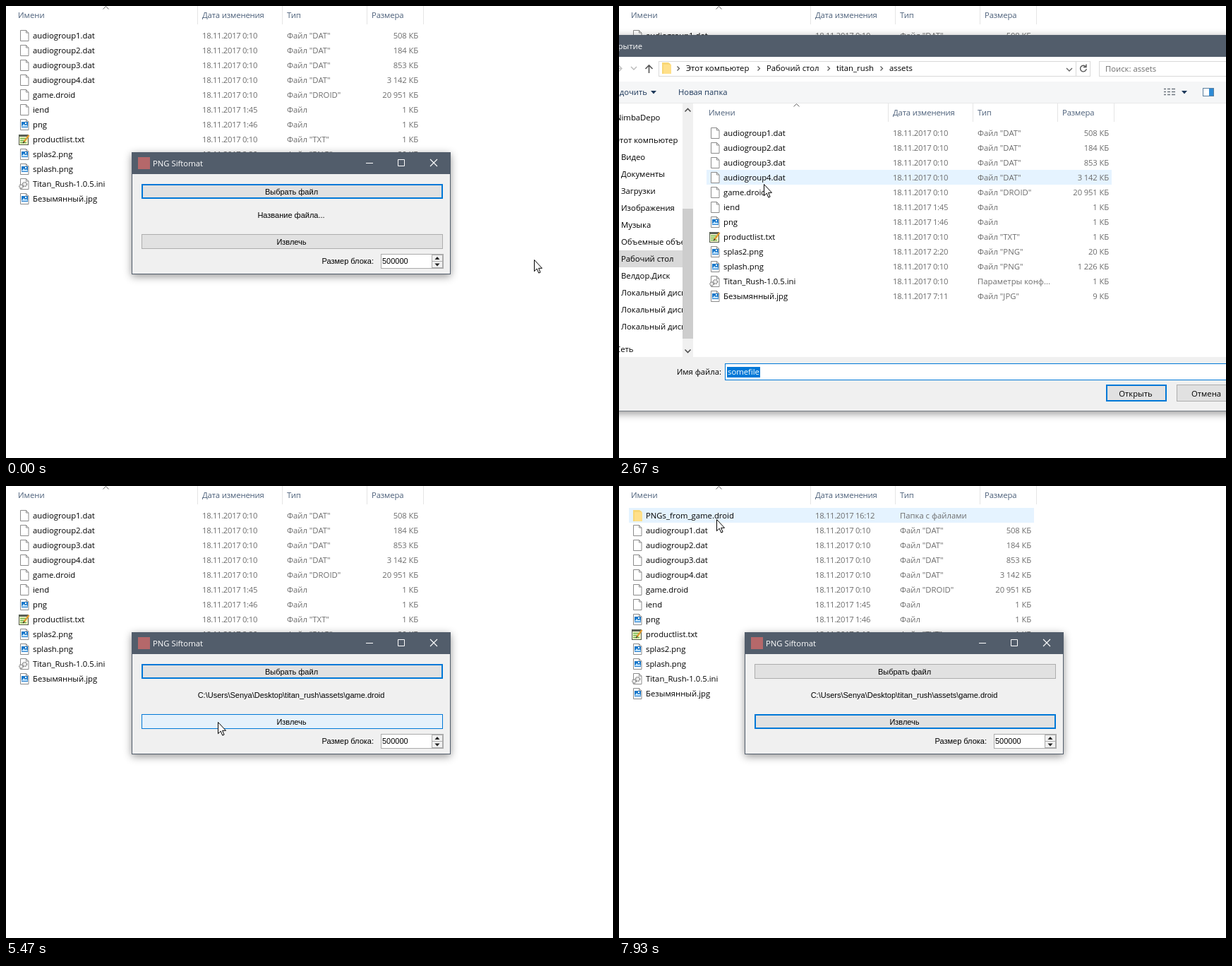
An HTML page that plays this animation: 860 by 640 pixels, repeating every 8000 ms.

```html
<!DOCTYPE html>
<html lang="ru">
<head>
<meta charset="utf-8">
<title>Извлечение PNG</title>
<style>
html, body { margin: 0; width: 100%; height: 100%; overflow: hidden; background: #fff; }
svg { display: block; width: 100%; height: 100%; }
text { font: 11.3px "Open Sans", "Noto Sans", sans-serif; white-space: pre; }
.a { font: 11px "Liberation Sans", Arial, sans-serif; }
.n { letter-spacing: -.33px; }
.h { letter-spacing: -.15px; }
.m { text-anchor: middle; }
.e { text-anchor: end; }
</style>
</head>
<body>
<svg id="stage" viewBox="0 0 860 640"></svg>
<script>
const LOOP = 8000, STEP = 200 / 3;
const BLUE = '#0078d7', BAR = '#525d6b', GREY = '#6d6d6d', HEAD = '#4c607a';
const FILE_PATH = String.raw`C:\Users\Senya\Desktop\titan_rush\assets\game.droid`;

const FILES = [
  ['audiogroup1.dat', '0:10', 'Файл "DAT"', '508 КБ'],
  ['audiogroup2.dat', '0:10', 'Файл "DAT"', '184 КБ'],
  ['audiogroup3.dat', '0:10', 'Файл "DAT"', '853 КБ'],
  ['audiogroup4.dat', '0:10', 'Файл "DAT"', '3 142 КБ'],
  ['game.droid', '0:10', 'Файл "DROID"', '20 951 КБ'],
  ['iend', '1:45', 'Файл', '1 КБ'],
  ['png', '1:46', 'Файл', '1 КБ'],
  ['productlist.txt', '0:10', 'Файл "TXT"', '1 КБ'],
  ['splas2.png', '2:20', 'Файл "PNG"', '20 КБ'],
  ['splash.png', '0:10', 'Файл "PNG"', '1 226 КБ'],
  ['Titan_Rush-1.0.5.ini', '0:10', 'Параметры конф...', '1 КБ'],
  ['Безымянный.jpg', '7:11', 'Файл "JPG"', '9 КБ']
];
const FOLDER = ['PNGs_from_game.droid', '16:12', 'Папка с файлами', ''];

const PLACES = [
  ['Видео', '#666'], ['Документы', '#a8adb2'], ['Загрузки', '#2a86d1'], ['Изображения', '#999'],
  ['Музыка', '#1e8fe0'], ['Объемные объекты', '#3aa5d8'], ['Рабочий стол', '#1f8fd6'],
  ['Велдор.Диск', '#3f9bd8'], ['Локальный диск', '#888'], ['Локальный диск', '#888'], ['Локальный диск', '#888']
];

// Pointer stops: time, x, y, eased
const TRACK = [
  [0, 748, 359], [867, 456, 265, 1], [1000, 434, 262], [2067, 434, 262],
  [2400, 300, 226], [2666, 205.5, 251.5], [2867, 195, 262], [3000, 190, 262], [3533, 168, 263],
  [4667, 168, 263], [4867, 200, 266], [5267, 300, 333], [5400, 300, 333], [5466, 300, 334],
  [6467, 300, 334], [6733, 372, 355, 1], [6867, 384, 357], [7400, 384, 358], [7930, 138, 47, 1]
];

const clamp = v => Math.max(0, Math.min(1, v));
const ramp = (t, a, b) => clamp((t - a) / (b - a));
const within = (t, a, b) => t >= a && t < b;

function pointer(t) {
  const i = TRACK.findIndex(p => p[0] > t);
  if (i < 0) return TRACK[TRACK.length - 1].slice(1, 3);
  const [t0, x0, y0] = TRACK[i - 1], [t1, x1, y1, eased] = TRACK[i];
  let u = ramp(t, t0, t1);
  if (eased) u = u * u * (3 - 2 * u);
  return [x0 + (x1 - x0) * u, y0 + (y1 - y0) * u];
}

const rect = (x, y, w, h, fill, more = '') =>
  `<rect x="${x}" y="${y}" width="${w}" height="${h}" fill="${fill}" ${more}/>`;
const frame = (x, y, w, h, fill, stroke) =>
  rect(x + .5, y + .5, w - 1, h - 1, fill, `stroke="${stroke}"`);
const line = (d, stroke, width = 1) =>
  `<path d="${d}" fill="none" stroke="${stroke}" stroke-width="${width}"/>`;
const shape = (d, fill) => `<path d="${d}" fill="${fill}"/>`;
const text = (x, y, s, fill = '#000', cls = '') =>
  `<text x="${x}" y="${y + 4}" fill="${fill}" class="${cls}">${s}</text>`;
const group = (content, attrs) => `<g ${attrs}>${content}</g>`;
const shadow = (dy, blur, a) => `style="filter:drop-shadow(0 ${dy}px ${blur}px rgba(0,0,0,${a}))"`;
const chevron = (x, y, c) => line(`M${x - 4} ${y - 2}l4 4 4-4`, c, 1.4);
const cross = (x, y, c) => line(`M${x - 5} ${y - 5}l10 10m0-10l-10 10`, c, 1.1);

function button(x, y, w, h, label, { focus = 0, hot = 0, down = 0, cls = 'm a' }) {
  const edge = down ? '#005499' : focus || hot ? BLUE : '#adadad';
  let s = rect(x, y, w, h, down ? '#cce4f7' : '#e1e1e1');
  if (!down) {
    s += rect(x, y, w, h, '#e5f1fb', `opacity="${hot}"`);
    if (focus) s += group(frame(x + 1, y + 1, w - 2, h - 2, 'none', BLUE), `opacity="${1 - hot}"`);
  }
  return s + frame(x, y, w, h, 'none', edge) + text(x + w / 2 - 1, y + h / 2 + .5, label, '#000', cls);
}

const folderIcon = (x, y) =>
  shape(`M${x} ${y - 8}h9l3 2v14h-12z`, '#f8d775') + rect(x + 2, y - 5, 11, 13, '#ffe08a');

function fileIcon(name, y) {
  const page = `<path d="M20.5 ${y - 7.5}h8l3.5 3.5v11.5h-11.5z" fill="#fff" stroke="#8b8b8b"/>` +
    line(`M28.5 ${y - 7.5}v3.5h3.5`, '#8b8b8b');
  const ext = name.split('.').pop();
  if (name === FOLDER[0]) return folderIcon(20, y);
  if (ext === 'txt') return frame(18, y - 7, 14, 15, '#f4f3c8', '#4f5a4a') +
    rect(19, y - 7, 12, 3, '#5c6157') + line(`M20 ${y - 1.5}h8m-8 3h7m-7 3h9`, '#69b54a', 1.4) +
    line(`M25 ${y + 4}l7.5-10`, '#e39a2d', 2.4) + line(`M24 ${y + 5}l2-2`, '#333', 1.5);
  if (ext === 'png' || ext === 'jpg') return page + rect(22, y - 4, 9, 8, '#1977c9') +
    shape(`M22 ${y + 3}l3-4 2 2 2-1 2 3z`, '#bfe3ff') + rect(27, y - 3, 2, 2, '#fff');
  if (ext === 'ini') return page +
    `<g fill="#eee" stroke="#8a8a8a" stroke-width="1.6" stroke-dasharray="1.6 .8">
      <circle cx="26.5" cy="${y + .5}" r="3"/><circle cx="21.5" cy="${y + 3.5}" r="2.6"/></g>`;
  return page;
}

function fileList(rows, hover, selected = -1) {
  let s = text(17, 13, 'Имени', HEAD) + text(278, 13, 'Дата изменения', HEAD, 'h') +
    text(398, 13, 'Тип', HEAD) + text(518, 13, 'Размера', HEAD, 'h') +
    line('M137.5 4.5l4-4 4 4', '#666') + line('M271.5 0v26m120-26v26m120-26v26m80-26v26', '#e5e5e5');
  rows.forEach(([name, time, type, size], i) => {
    const y = 42 + 21 * i;
    if (i === selected) s += frame(14, y - 11, 574, 21, '#cce8ff', '#99d1ff');
    else if (i === hover) s += rect(14, y - 11, 574, 21, '#e5f3ff');
    s += fileIcon(name, y) + text(38, y, name) + text(278, y, '18.11.2017 ' + time, GREY, 'n') +
      text(398, y, type, GREY) + text(584, y, size, GREY, 'e h');
  });
  return s;
}

function rowAt(x, y, dx, dy) {
  return x >= 14 + dx && x < 588 + dx ? Math.floor((y - 31 - dy) / 21) : -1;
}

function appWindow(t, x, y) {
  const active = t < 1330 || within(t, 4260, 6000) || t >= 7060;
  const over = top => +(active && x >= 192 && x < 619 && y >= top && y < top + 21);
  const ink = active ? '#fff' : '#999';
  const extracting = t >= 5720;
  return rect(178, 207, 452, 173, '#f0f0f0', active ? shadow(3, 6, .42) : shadow(2, 4, .28)) +
    rect(178, 207, 452, 31, active ? BAR : '#fff') +
    frame(178, 207, 452, 173, 'none', active ? BAR : '#a5a5a5') +
    rect(187, 214, 17, 17, active ? '#b5686a' : '#9c5a58') +
    text(208, 223, 'PNG Siftomat', ink) +
    line('M510 222.5h10M555.5 217.5h9v9h-9z', ink) + cross(606, 222, ink) +
    button(192, 252, 427, 21, 'Выбрать файл',
      { focus: !extracting, hot: over(252), down: within(t, 1190, 1730) }) +
    text(404, 296, t < 4260 ? 'Название файла...' : FILE_PATH, '#000', 'm a') +
    button(192, 323, 427, 21, 'Извлечь',
      { focus: extracting, hot: over(323), down: within(t, 5720, 5860) }) +
    text(521, 361, 'Размер блока:', '#000', 'e a') +
    frame(531, 351, 89, 21, '#fff', '#ababab') + text(533, 361, '500000', '#000', 'a') +
    frame(603, 352, 16, 10, '#f0f0f0', '#acacac') + frame(603, 361, 16, 10, '#f0f0f0', '#acacac') +
    shape('M607.5 359l3.5-4 3.5 4zM607.5 364.5h7l-3.5 4z', '#222');
}

function sidebar() {
  let s = rect(-95, 346, 185, 24, '#d9d9d9') +
    rect(-25, 152, 15, 11, '#f5d67a') + rect(-25, 184, 15, 11, '#4a9fd8') + rect(-25, 480, 15, 11, '#3a8fd0') +
    text(-5, 158, 'NimbaDepo') + text(-6, 190, 'Этот компьютер') + text(-5, 486, 'Сеть');
  PLACES.forEach(([name, color], i) => {
    const y = 214 + 24 * i;
    s += i === 7 ? `<circle cx="-11" cy="${y}" r="6" fill="${color}"/>`
      : i > 7 ? rect(-19, y + 1, 15, 4, color) : rect(-18, y - 6, 13, 12, color);
    s += text(3, y, name);
  });
  return s + rect(90, 138, 795, 359, '#fff') + rect(90, 138, 15, 359, '#f0f0f0') +
    rect(90, 287, 15, 184, '#cdcdcd') +
    line('M93.5 149.5l4-4 4 4M93.5 486.5l4 4 4-4', '#505050', 1.6);
}

function addressBar() {
  const crumbs = [[95, 'Этот компьютер'], [209, 'Рабочий стол'], [308, 'titan_rush'], [383, 'assets']];
  return line('M-9 88.5h13m-4-4l4 4-4 4', '#c4c4c4', 1.4) + chevron(21, 88, '#b9b9b9') +
    line('M42.5 95v-11m-5 5l5-5 5 5', '#555', 1.6) +
    frame(56, 78, 612, 22, '#fff', '#d9d9d9') + folderIcon(61, 88) +
    crumbs.map(([x, s]) => line(`M${x - 12.5} 85.5l3 3-3 3`, '#555', 1.2) + text(x, 88, s)).join('') +
    chevron(638, 90, '#666') + line('M647.5 79v20', '#d9d9d9') +
    line('M661 85.5a4.3 4.3 0 1 0 1.2 3.5M662 82.5v4h-4', '#555', 1.4) +
    frame(680, 78, 196, 22, '#fff', '#d9d9d9') + text(689, 89, 'Поиск: assets', GREY) +
    `<circle cx="868" cy="87" r="3.6" fill="none" stroke="#666" stroke-width="1.4"/>` + line('M865 90l-4 4', '#666', 1.6);
}

function toolbar() {
  const c = '#1e395b';
  return rect(-95, 107, 980, 31, '#f5f6f7') + rect(-95, 137, 980, 1, '#e8e9ea') +
    text(40, 122, 'Упорядочить', c, 'e') + shape('M45 120h8l-4 4.5zM797 120h8l-4 4.5z', c) +
    text(84, 122, 'Новая папка', c) +
    line('M772 117.5h3m2 0h4m2 0h5M772 121.5h3m2 0h4m2 0h5M772 125.5h3m2 0h4m2 0h5', '#6f7780', 1.6) +
    frame(827, 116, 16, 12, '#fff', '#5b7f9f') + rect(836, 117, 6, 10, '#2e8bd6') +
    `<circle cx="870" cy="122" r="8" fill="#2f83cc"/>` + text(870, 122, '?', '#fff', 'm');
}

function openDialog(t, x, y) {
  const picked = t >= 2925, blurred = t >= 2995;
  const hover = t < 4260 ? rowAt(x, y, 110, 138) : -1;
  const field = picked
    ? text(154, 518, 'game.droid')
    : rect(153, 511, 47, 15, BLUE) + text(154, 518, 'somefile', '#fff');
  return rect(-95, 41, 980, 533, '#fff', shadow(3, 6, .42)) +
    rect(-95, 41, 980, 31, BAR) + text(33, 57, 'Открытие', '#fff', 'e') +
    addressBar() + toolbar() + sidebar() +
    group(fileList(FILES, hover, picked ? 4 : -1), 'transform="translate(110 138)"') +
    rect(-95, 497, 980, 76, '#f0f0f0') + rect(-95, 573, 980, 1, '#747b84') +
    text(145, 518, 'Имя файла:', '#000', 'e') +
    frame(150, 506, 726, 24, '#fff', blurred ? '#b5b5b5' : BLUE) + field + chevron(867, 518, '#666') +
    button(690, 536, 86, 24, 'Открыть', { focus: 1, cls: 'm' }) +
    button(790, 536, 86, 24, 'Отмена', { cls: 'm' });
}

function messageBox(t) {
  const hot = ramp(t, 6670, 6870) * .999;
  return rect(302, 241, 145, 133, '#fff', shadow(3, 6, .42)) + rect(302, 331, 145, 43, '#f0f0f0') +
    rect(302, 241, 145, 31, BAR) + frame(302, 241, 145, 133, 'none', BAR) +
    text(311, 257, 'Done!', '#fff') + cross(431, 256, '#fff') +
    text(314, 302, 'Exported PNGs: 118', '#000', 'n') +
    button(357, 341, 73, 21, 'OK', { focus: 1, hot, down: within(t, 6920, 6990), cls: 'm' });
}

// Windows fade while they scale about their centre
function popup(content, alpha, shrink, cx, cy) {
  if (alpha <= 0) return '';
  const k = 1 - shrink * (1 - alpha);
  return group(content, `opacity="${alpha}" transform="translate(${cx} ${cy}) scale(${k}) translate(${-cx} ${-cy})"`);
}

function scene(t) {
  const [x, y] = pointer(t);
  const inApp = x >= 178 && x < 630 && y >= 207 && y < 380;
  const hover = within(t, 1330, 4260) || inApp ? -1 : rowAt(x, y, 0, 0);
  const rows = t >= 7190 ? [FOLDER, ...FILES] : FILES;
  let s = rect(0, 0, 860, 640, '#fff') + fileList(rows, hover) + appWindow(t, x, y);

  const closing = t >= 4200;
  const dialog = closing ? Math.pow(1 - ramp(t, 4200, 4500), 1.5) : 1 - Math.pow(1 - ramp(t, 1400, 1730), 1.6);
  s += popup(openDialog(t, x, y), dialog, closing ? .046 : .058, 395, 305);

  const message = t < 6900 ? 1 - Math.pow(1 - ramp(t, 5990, 6320), 1.6) : Math.pow(1 - ramp(t, 6970, 7190), 1.5);
  s += popup(messageBox(t), message, .05, 374.5, 307.5);

  const px = Math.round(x), py = Math.round(y);
  return s + `<path transform="translate(${px} ${py})" fill="#fff" stroke="#000"
    d="M.5.5v16.2l3.7-3.6 2.6 6 2.3-1-2.5-5.8h4.9z"/>`;
}

const stage = document.getElementById('stage');
const start = performance.now();
let shown = -1;
function tick() {
  const t = (performance.now() - start) % LOOP;
  const step = Math.floor((t + 4) / STEP) % (LOOP / STEP);
  if (step !== shown) {
    shown = step;
    stage.innerHTML = scene(step * STEP);
  }
  requestAnimationFrame(tick);
}
tick();
</script>
</body>
</html>
```
